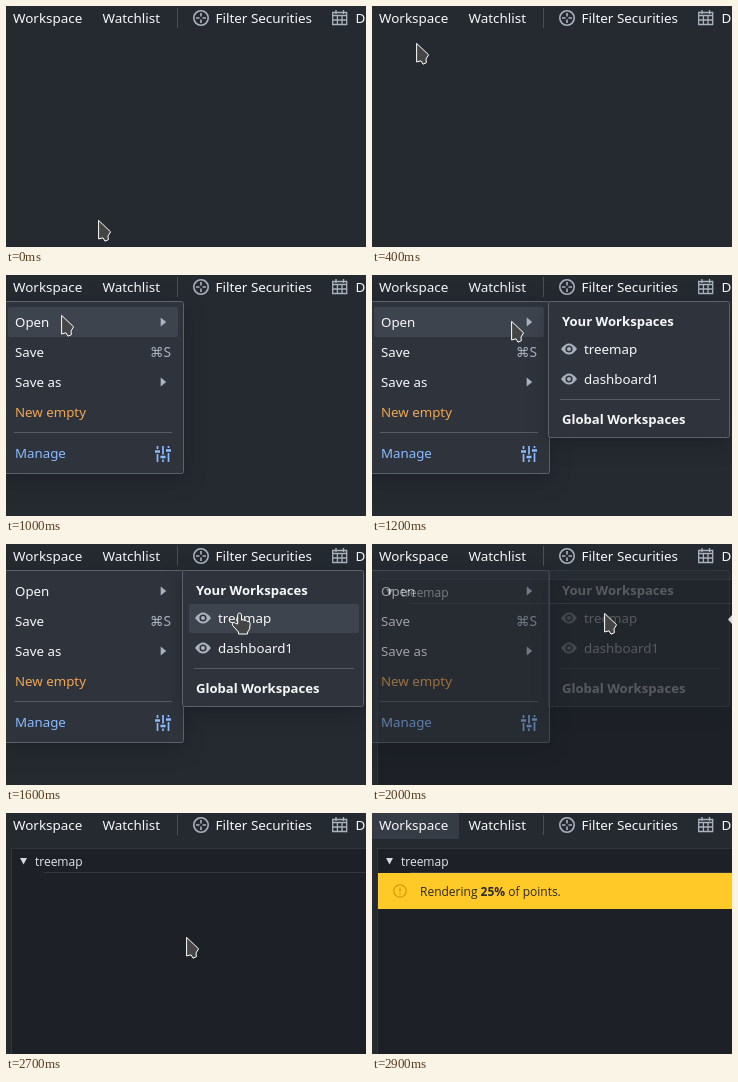
These frames come from a looping animation (360x241 px, 3.6 s). An HTML page:

```html
<!DOCTYPE html>
<html lang="en">
<head>
<meta charset="utf-8">
<title>Workspace menu</title>
<style>
  html, body { margin: 0; width: 100%; height: 100%; overflow: hidden; background: #252a31; }
  svg { display: block; width: 360px; height: 241px; }
  text { font: 13.3px "Noto Sans", sans-serif; fill: #f6f7f9; white-space: pre; }
  .bar text { font-size: 13.45px; }
  .bold { font-weight: 700; font-size: 13.1px; }
  .small { font: 12px "Open Sans", sans-serif; fill: #e4e6ea; }
  .key { font-family: "Noto Sans", "DejaVu Sans", sans-serif; font-size: 13.7px; fill: #abb3bf; }
  .icon { fill: none; stroke: #abb3bf; stroke-width: 1.6; }
  .mark { fill: #abb3bf; }
  .sheet { fill: #2f343c; stroke: #5b626c; filter: drop-shadow(0 6px 10px rgba(17, 20, 24, .4)); }
  .rule { stroke: #565c66; }
  .hover { fill: #3e444e; }
  .pointer { fill: #454545; stroke: #fff; stroke-linejoin: round; }

  .step { animation: 3.6s step-end infinite; }
  #panel { animation-name: panel; }
  #button { animation-name: button; }
  #menu { animation-name: menu; }
  #open { animation-name: open; }
  #submenu { animation-name: submenu; }
  #item { animation-name: item; }
  #tip { animation-name: tip; }
  #banner { animation-name: banner; }
  #cursor { animation-name: move; }
  #arrow { animation-name: arrow; }
  #hand { animation-name: hand; }

  @keyframes panel { 0% { opacity: 0 } 52.77%, 100% { opacity: 1 } }
  @keyframes button { 0%, 25% { opacity: 0 } 13.88%, 80.55%, 100% { opacity: 1 } }
  @keyframes menu {
    0%, 58.33%, 100% { opacity: 0 }
    13.88% { opacity: .6 }
    16.66% { opacity: 1 }
    52.77% { opacity: .85 }
    55.55% { opacity: .6 }
  }
  @keyframes open { 0%, 36.11%, 100% { opacity: 0 } 25% { opacity: 1 } }
  @keyframes submenu {
    0%, 58.33%, 100% { opacity: 0 }
    30.55% { opacity: .6 }
    33.33% { opacity: 1 }
    52.77% { opacity: .8 }
    55.55% { opacity: .27 }
  }
  @keyframes item { 0%, 52.77%, 100% { opacity: 0 } 41.66% { opacity: 1 } }
  @keyframes tip { 0%, 58.33%, 100% { opacity: 0 } 50% { opacity: 1 } }
  @keyframes banner { 0% { opacity: 0 } 80.55%, 100% { opacity: 1 } }
  @keyframes arrow { 0%, 25%, 52.77% { opacity: 1 } 13.88%, 41.66%, 80.55%, 100% { opacity: 0 } }
  @keyframes hand { 0%, 25%, 52.77%, 100% { opacity: 0 } 13.88%, 41.66% { opacity: 1 } }
  @keyframes move {
    0% { transform: translate(93px, 215px) }
    2.77% { transform: translate(86px, 188px) }
    5.55% { transform: translate(73px, 141px) }
    8.33% { transform: translate(58px, 84px) }
    11.11% { transform: translate(45px, 38px) }
    13.88% { transform: translate(40px, 18px) }
    16.66% { transform: translate(38px, 14px) }
    22.22% { transform: translate(42px, 20px) }
    25% { transform: translate(49px, 31px) }
    27.77% { transform: translate(56px, 41px) }
    30.55% { transform: translate(90px, 45px) }
    33.33% { transform: translate(140px, 47px) }
    36.11% { transform: translate(185px, 52px) }
    38.88% { transform: translate(212px, 60px) }
    41.66% { transform: translate(228px, 67px) }
    44.44% { transform: translate(233px, 69px) }
    52.77% { transform: translate(233px, 70px) }
    66.66% { transform: translate(230px, 76px) }
    69.44% { transform: translate(218px, 92px) }
    72.22% { transform: translate(199px, 113px) }
    75% { transform: translate(181px, 125px) }
    77.77%, 100% { transform: translate(110px, 68px) }
  }
</style>
</head>
<body>
<svg viewBox="0 0 360 241">
  <defs>
    <path id="caret" class="mark" d="M0 0 5.5 4.5 0 9z"/>
    <g id="eye">
      <path class="mark" d="M0 6Q8-5 16 6Q8 17 0 6z"/>
      <circle cx="8" cy="6" r="3.6" fill="#2f343c"/>
      <circle cx="8" cy="6" r="2" class="mark"/>
    </g>
  </defs>

  <rect width="360" height="241" fill="#252a31"/>

  <g id="panel" class="step">
    <rect x="5.5" y="35.5" width="360" height="212" fill="#1d2127" stroke="#30353c"/>
    <path d="M38 59.5H360" stroke="#343940"/>
    <path d="M14 45h7l-3.5 6.5z" fill="#d5d8dd"/>
    <text class="small" x="29" y="53">treemap</text>
  </g>

  <g id="banner" class="step">
    <rect x="6" y="60" width="354" height="36" fill="#ffc927"/>
    <g fill="none" stroke="#d39b0c" stroke-width="1.3">
      <circle cx="28" cy="78" r="6.2"/>
      <path d="M28 74.5v4.2M28 80v1.6"/>
    </g>
    <text class="small" x="48" y="83" style="fill:#2b2a25">Rendering <tspan font-weight="700">25%</tspan> of points.</text>
  </g>

  <rect id="button" class="step" width="87" height="26" fill="#363c45"/>
  <g class="bar">
    <text x="7" y="17">Workspace</text>
    <text x="96.5" y="17">Watchlist</text>
    <path d="M171.5 2V22" stroke="#4a5059"/>
    <g class="icon">
      <circle cx="195" cy="12" r="7.2"/>
      <path d="M195 7v3.5M195 13.5v3.5M190 12h3.5M196.5 12h3.5"/>
    </g>
    <text x="209.5" y="17">Filter Securities</text>
    <path class="icon" style="stroke-width:1.3" d="M326.7 6.5h14v12h-14zM327 9.5h13.5M327 14h13.5M331.4 10v8.5M336 10v8.5M330 4v4M337.5 4v4"/>
    <text x="349.5" y="17">D</text>
  </g>

  <g id="menu" class="step">
    <rect class="sheet" x="-4.5" y="26.5" width="182" height="172" rx="2"/>
    <rect id="open" class="step hover" x="2" y="32" width="170" height="30" rx="2"/>
    <text x="9" y="52">Open</text>
    <use href="#caret" x="154.7" y="42.5"/>
    <text x="9" y="82">Save</text>
    <text class="key" x="165" y="82" text-anchor="end">⌘S</text>
    <text x="9" y="112">Save as</text>
    <use href="#caret" x="154.7" y="102.5"/>
    <text x="9" y="142" style="fill:#f0a552">New empty</text>
    <path class="rule" d="M8 157.5H166"/>
    <text x="9" y="183" style="fill:#8abbff">Manage</text>
    <g stroke="#8abbff" stroke-width="1.7">
      <path d="M151.5 171v3M151.5 179v8M157 171v8.5M157 184.5v2.5M162.5 171v2M162.5 178v9"/>
      <path d="M149 176.5h5M154.5 182h5M160 175.5h5" stroke-width="2.6"/>
    </g>
  </g>

  <g id="submenu" class="step">
    <rect class="sheet" x="176.5" y="26.5" width="181" height="136" rx="2"/>
    <rect id="item" class="step hover" x="183" y="60" width="170" height="29" rx="2"/>
    <text class="bold" x="190" y="51">Your Workspaces</text>
    <use href="#eye" x="189" y="68"/>
    <text x="212" y="79">treemap</text>
    <use href="#eye" x="189" y="98"/>
    <text x="212" y="109">dashboard1</text>
    <path class="rule" d="M188 124.5H348"/>
    <text class="bold" x="190" y="149">Global Workspaces</text>
  </g>

  <path id="tip" class="step" d="M356 75.5 360 71v9z" fill="#d5d9df"/>

  <g id="cursor" class="step">
    <path id="arrow" class="step pointer" d="M-.4-.6V18L4 16.8 6 20.2 9.4 18.7 9 15 11.6 10.8z"/>
    <path id="hand" class="step pointer" d="M-1.3 11V1.8Q-1.1 0 .7 0 2.3 0 2.5 1.8V7.2Q4.3 5.8 5.3 7.6 7.3 6.6 8.1 8.4 10.9 7.8 11.2 10.6L10.6 16 8.6 19V21H-.5V19L-6.5 12.4Q-7.5 10.4-5.5 9.6-4.3 9.4-3.3 10.4z"/>
  </g>
</svg>
</body>
</html>
```
